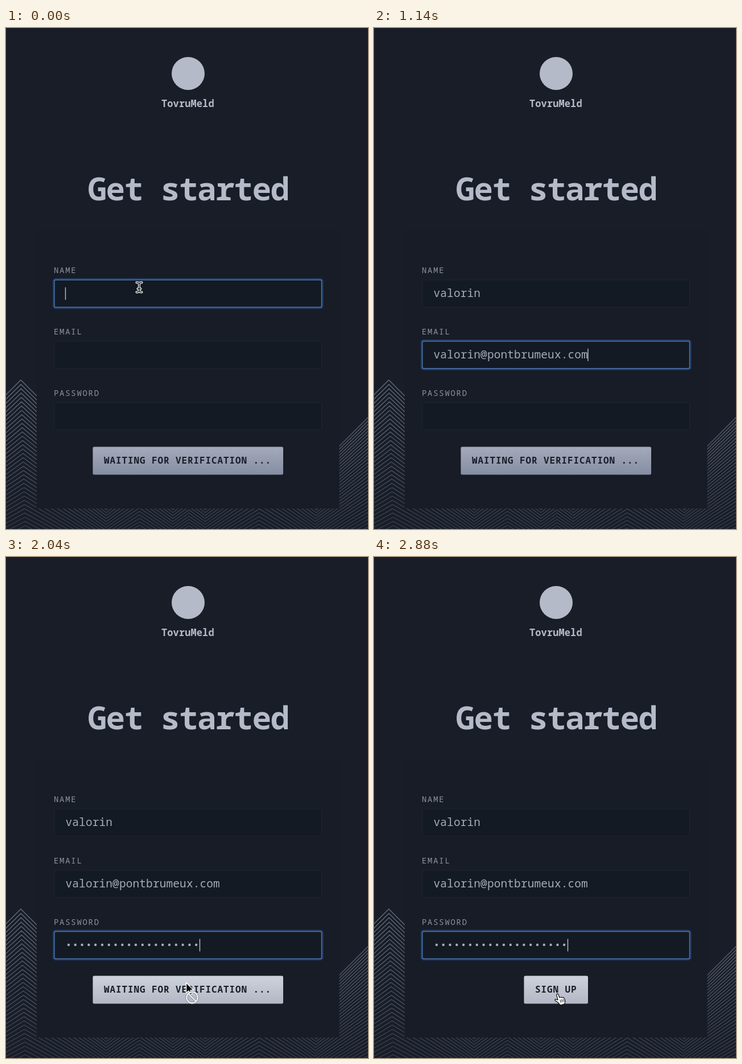
An HTML page for the animation above (3.88 s loop, 636 px wide and 881 px high).

```html
<!DOCTYPE html>
<html lang="en">
<head>
<meta charset="utf-8">
<title>Get started</title>
<style>
  html, body { margin: 0; width: 100%; height: 100%; overflow: hidden; background: #181d28; }
  svg { display: block; width: 100%; height: 100%; }
  text { font-family: "Noto Sans Mono", "DejaVu Sans Mono", monospace; white-space: pre; }
  .bold { font-weight: 700; fill: #b5bac8; }
  .label { font-size: 14px; letter-spacing: 1.7px; fill: #8b909f; }
  .value { font-size: 19.5px; letter-spacing: .1px; fill: #a5abb9; }
  .action { font-size: 16px; letter-spacing: .9px; font-weight: 700; fill: #181d28; }
  .box { fill: #141a23; stroke: #20252f; }
  .focus .box { stroke: #4b76b0; stroke-width: 1.4; }
  .ring { fill: none; stroke: #203a62; stroke-width: 3; visibility: hidden; }
  .focus .ring { visibility: visible; }
  .dots { fill: none; stroke: #a5abb9; stroke-width: 4.4; stroke-linecap: round; }
</style>
</head>
<body>
<svg viewBox="0 0 636 881" preserveAspectRatio="none">
  <defs>
    <linearGradient id="fade" gradientUnits="userSpaceOnUse" x1="0" y1="615" x2="0" y2="881">
      <stop offset="0" stop-color="#676d7c"/>
      <stop offset="1" stop-color="#343a47"/>
    </linearGradient>
    <linearGradient id="rest" x2="0" y2="1">
      <stop offset="0" stop-color="#a4aaba"/>
      <stop offset="1" stop-color="#858ea3"/>
    </linearGradient>
    <linearGradient id="hover" x2="0" y2="1">
      <stop offset="0" stop-color="#cdd2dc"/>
      <stop offset="1" stop-color="#b3b7c5"/>
    </linearGradient>
  </defs>
  <rect width="636" height="881" fill="#181d28"/>
  <path id="hills" fill="none" stroke="url(#fade)" stroke-width="1.4"/>
  <rect x="54" y="355" width="531.5" height="490" fill="#181c26"/>

  <circle cx="320" cy="80" r="29" fill="#b5bac8"/>
  <text class="bold" x="273" y="138.5" font-size="17" letter-spacing=".1">TovruMeld</text>
  <text class="bold" x="143.5" y="303" font-size="56" letter-spacing="-1.5">Get started</text>

  <g id="fields"></g>
  <rect id="caret" width="1.4" height="22" fill="#b9becb"/>

  <rect id="button" y="736.5" height="49" rx="2.5"/>
  <text id="action" class="action" y="766"></text>

  <g id="cursor">
    <g id="beam" fill="none" stroke-linecap="round" stroke-linejoin="round">
      <path d="M-4.5 -8.5Q0 -8.5 0 -5.5Q0 -8.5 4.5 -8.5M0 -5.5V5.5M-4.5 8.5Q0 8.5 0 5.5Q0 8.5 4.5 8.5M-2.5 2.5H2.5" stroke="#fff" stroke-width="4"/>
      <path d="M-4.5 -8.5Q0 -8.5 0 -5.5Q0 -8.5 4.5 -8.5M0 -5.5V5.5M-4.5 8.5Q0 8.5 0 5.5Q0 8.5 4.5 8.5M-2.5 2.5H2.5" stroke="#10141b" stroke-width="1.5"/>
    </g>
    <path id="arrow" d="M0 0V18.3L4.2 14.4L7.2 21.2L10.6 19.7L7.6 13.1H13Z" fill="#090b10" stroke="#fff" stroke-width="1.4" stroke-linejoin="round"/>
    <g id="denied" fill="none">
      <path d="M3.2 18.7L17.8 33.3" stroke="#777d89" stroke-width="4"/>
      <circle cx="10.5" cy="26" r="9.8" stroke="#777d89" stroke-width="4"/>
      <path d="M3.6 19.1L17.4 32.9" stroke="#eceef2" stroke-width="2.4"/>
      <circle cx="10.5" cy="26" r="9.8" stroke="#eceef2" stroke-width="2.4"/>
    </g>
    <g id="hand" stroke="#0b0d12" stroke-linecap="round" stroke-linejoin="round">
      <path d="M-1.8 1.4Q-1.6 -.5 .2 -.3Q1.4 0 1.8 1.6L3.3 6.3Q4.4 4.8 6 6.1Q7.5 4.8 9 6.4Q10.8 5.6 11.8 7.5Q14.2 12 12.5 17.2L5 19.5Q2.5 17.3 .8 14.8L-3.8 12Q-5.6 9.8 -3.4 9.2L.6 10.4Z" fill="#fff" stroke-width="1.2"/>
      <path d="M4.5 10.2L5.7 14.6M7.3 9.7L8.4 14M10 9.2L11 13.2" fill="none" stroke-width="1"/>
    </g>
  </g>
</svg>
<script>
const LOOP = 3880, STEP = 60, END = 2880;
const PITCH = 11.8, LEFT = 104.5;
const NAME = "valorin", EMAIL = "valorin@pontbrumeux.com";
const SECRET = 20;
const EMAIL_AT = 300, SECRET_AT = 1200, READY_AT = 2520;

const $ = id => document.getElementById(id);
const clamp = (v, lo, hi) => Math.max(lo, Math.min(hi, v));
const setAll = (el, attrs) => Object.entries(attrs).forEach(([k, v]) => el.setAttribute(k, v));

// Stacked ridges: alternating peaks and valleys that flatten and narrow downwards
function ridges() {
  let d = "";
  for (let i = 0; i < 37; i++) {
    const base = 769 + 5.2 * i, slope = 1 - .0148 * i, drift = .45 * i;
    const valleys = [drift - 124, 176, 293, 350, 552 - drift, 799 - drift];
    valleys.forEach((x, k) => {
      d += `${k ? "L" : "M"}${x} ${base}`;
      if (k < valleys.length - 1) {
        const half = (valleys[k + 1] - x) / 2;
        d += `L${x + half} ${base - half * slope}`;
      }
    });
  }
  return d;
}
$("hills").setAttribute("d", ridges());

const fieldTops = [443, 550.8, 658.5];
$("fields").innerHTML = ["NAME", "EMAIL", "PASSWORD"].map((label, i) => {
  const y = fieldTops[i];
  return `<g>
    <text class="label" x="84" y="${y - 12}">${label}</text>
    <rect class="ring" x="83.5" y="${y - 1.5}" width="472.5" height="51" rx="3.5"/>
    <rect class="box" x="85" y="${y}" width="469.5" height="48" rx="2.5"/>
    ${i < 2 ? `<text class="value" x="${LEFT}" y="${y + 30}"></text>` : `<path class="dots" stroke-dasharray="0 ${PITCH}"/>`}
  </g>`;
}).join("");
const fields = [...$("fields").children];
const values = document.querySelectorAll(".value");
const dots = document.querySelector(".dots");

// Pointer hot spot: time, x, y
const track = [
  [1680, 234, 456], [1800, 326, 716], [1920, 318, 745], [2040, 316.5, 748.5],
  [2160, 316.5, 765], [2280, 316.5, 812], [2580, 316.5, 812], [2760, 322.5, 768.5]
];
function pointer(t) {
  const next = track.findIndex(p => p[0] > t);
  if (next === 0) return track[0].slice(1);
  if (next < 0) return track[track.length - 1].slice(1);
  const [t0, x0, y0] = track[next - 1], [t1, x1, y1] = track[next];
  const k = (t - t0) / (t1 - t0);
  return [x0 + (x1 - x0) * k, y0 + (y1 - y0) * k];
}

const show = (id, on) => $(id).setAttribute("visibility", on ? "inherit" : "hidden");
const typed = (t, start, rate, max) => clamp(Math.round((t - start) * rate), 0, max);

function draw(t) {
  const counts = [
    typed(t, 0, .03, NAME.length),
    typed(t, EMAIL_AT, EMAIL.length / 840, EMAIL.length),
    typed(t, SECRET_AT, .03, SECRET)
  ];
  const active = t < EMAIL_AT ? 0 : t < SECRET_AT ? 1 : 2;
  fields.forEach((f, i) => f.classList.toggle("focus", i === active));
  values[0].textContent = NAME.slice(0, counts[0]);
  values[1].textContent = EMAIL.slice(0, counts[1]);
  dots.setAttribute("d", counts[2] ? `M110 682h${(counts[2] - 1) * PITCH + .1}` : "");
  setAll($("caret"), { x: LEFT - .7 + counts[active] * PITCH, y: fieldTops[active] + 13 });

  const ready = t >= READY_AT;
  const [x, y] = pointer(t);
  const moving = t >= 1680;
  const left = ready ? 263.5 : 152.5, width = ready ? 112.5 : 334.5;
  const over = moving && y >= 736.5 && y <= 785.5 && x >= left && x <= left + width;
  setAll($("button"), { x: left, width, fill: `url(#${over ? "hover" : "rest"})` });
  $("action").setAttribute("x", left + 19.5);
  $("action").textContent = ready ? "SIGN UP" : "WAITING FOR VERIFICATION ...";

  const beam = y < 725;
  $("cursor").setAttribute("transform", `translate(${x} ${y})`);
  show("cursor", t < STEP || moving);
  show("beam", beam);
  show("hand", over && ready);
  show("arrow", !beam && !(over && ready));
  show("denied", over && !ready);
}

const start = performance.now();
function tick() {
  const t = (performance.now() - start) % LOOP;
  draw(Math.min(END, Math.floor(t / STEP) * STEP));
  requestAnimationFrame(tick);
}
tick();
</script>
</body>
</html>
```
